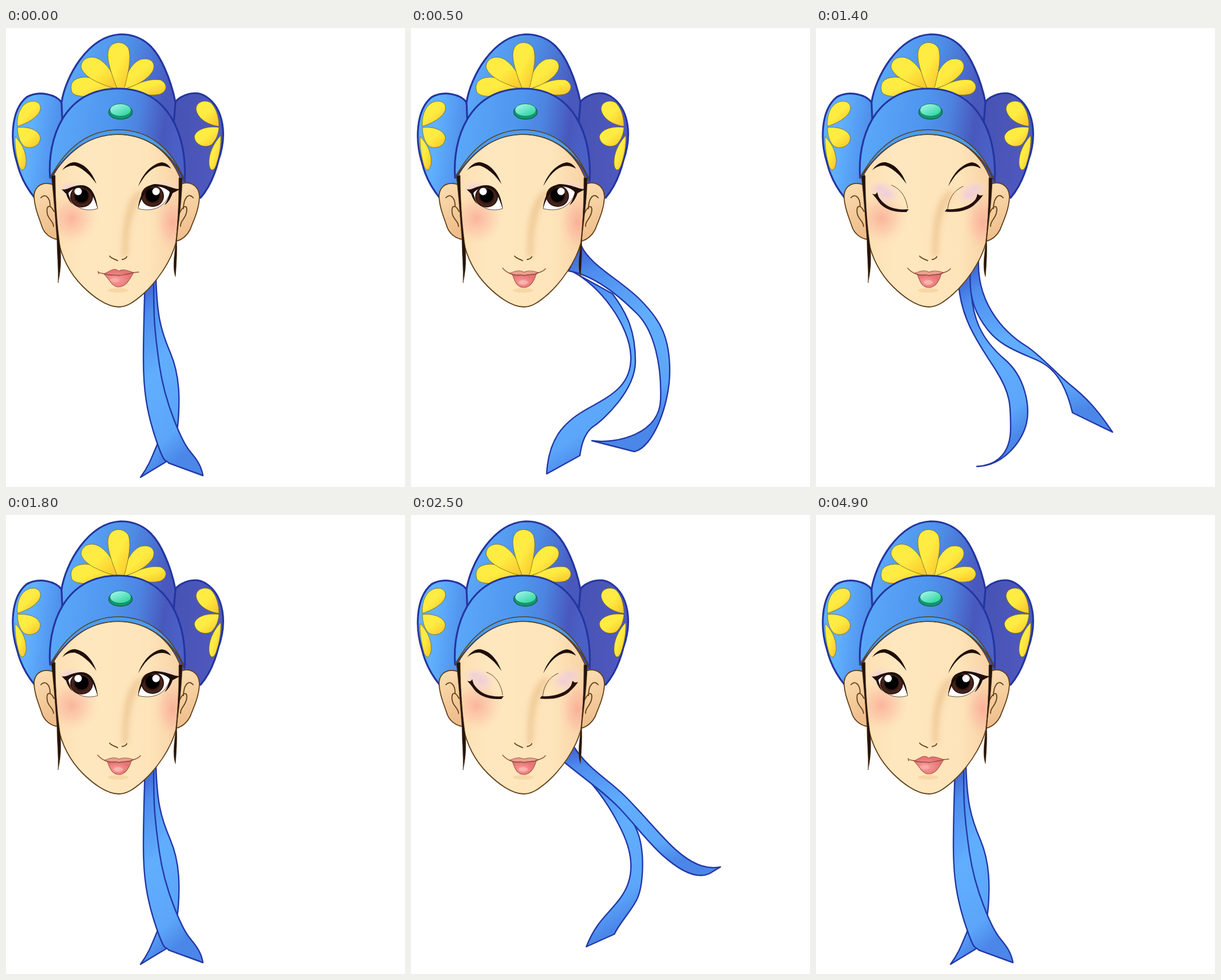
These frames come from a looping animation (697x803 px, 5100 ms). An HTML page:

```html
<!DOCTYPE html>
<html lang="en">
<head>
<meta charset="utf-8">
<title>Ribbon in the wind</title>
<style>
html, body { margin: 0; width: 100%; height: 100%; overflow: hidden; background: #fff; }
svg { display: block; width: 100%; height: 100%; }

/* front (f) and back (b) tail: hanging, curled, flying, falling, swinging, lifted */
:root {
  --hang-f: path("M243 440C241 500 240 530 240 580S245 670 262 720S278 752 284 761L344 783C340 760 328 750 318 736S278 660 268 590S258 500 258 440Z");
  --hang-b: path("M246 440C248 490 252 540 258 590S276 700 264 729S248 768 235 786L281 758C290 735 299 715 301 685S305 610 287 568S264 500 262 440Z");
  --curl-f: path("M275 425C320 432 365 470 395 500S438 590 436 650S360 728 316 722L390 741C422 735 452 660 452 600S435 510 400 475S312 415 297 380Z");
  --curl-b: path("M280 425C330 450 382 520 384 574S345 645 305 668S240 720 237 780L295 748C298 725 306 705 320 696S392 635 392 583S378 500 352 465Z");
  --fly-f: path("M285 412C330 450 380 450 430 443S520 434 560 438S625 485 681 527L670 487C650 462 625 430 560 427S470 440 430 437S325 425 300 368Z");
  --fly-b: path("M286 412C310 445 360 452 420 461S510 462 550 475S640 525 659 572L671 547C650 512 620 486 585 475S490 455 430 447S330 440 302 385Z");
  --fall-f: path("M270 425C266 470 278 500 300 528S350 565 388 582S440 640 448 673L518 707C490 665 470 645 445 625S390 570 365 555S280 490 284 405Z");
  --fall-b: path("M249 440C250 510 290 560 315 600S340 660 340 700S320 765 281 767L283 767C330 765 362 720 368 690S365 610 330 580S265 510 272 425Z");
  --swing-f: path("M262 436C320 440 345 490 362 530S390 595 415 625S490 690 549 663L563 641C535 655 495 658 470 643S405 600 393 555S370 440 285 402Z");
  --lift-f: path("M270 425C325 450 370 470 405 490S470 540 500 555S570 600 600 583L606 560C570 575 540 560 510 535S450 480 410 460S330 430 292 392Z");
  --lift-b: path("M275 422C335 448 375 490 405 540S425 620 400 650S350 690 330 745L380 725C390 705 410 690 425 670S445 580 430 545S380 480 340 455Z");
}

.tail { stroke: #2338a8; stroke-width: 2.4; stroke-linejoin: round; }
.front { d: var(--hang-f); animation: front 5100ms infinite; }
.back { d: var(--hang-b); animation: back 5100ms infinite; }
.swap { opacity: 0; animation: 5100ms step-end infinite; }
.open { animation-name: open; }
.shut { animation-name: shut; }
.calm { animation-name: calm; }
.smile { animation-name: smile; }
.round { animation-name: round; }

/* the drawing changes every 100 ms */
@keyframes front {
  0% { d: var(--hang-f); animation-timing-function: steps(5); }
  9.803% { d: var(--curl-f); animation-timing-function: steps(4); }
  17.647% { d: var(--fly-f); animation-timing-function: steps(5); }
  27.45% { d: var(--fall-f); animation-timing-function: steps(4); }
  35.294% { d: var(--hang-f); animation-timing-function: steps(4); }
  43.137% { d: var(--swing-f); animation-timing-function: steps(2); }
  47.058% { d: var(--lift-f); animation-timing-function: steps(4); }
  54.901%, 100% { d: var(--hang-f); }
}
@keyframes back {
  0% { d: var(--hang-b); animation-timing-function: steps(5); }
  9.803% { d: var(--curl-b); animation-timing-function: steps(4); }
  17.647% { d: var(--fly-b); animation-timing-function: steps(5); }
  27.45% { d: var(--fall-b); animation-timing-function: steps(4); }
  35.294% { d: var(--hang-b); animation-timing-function: steps(4); }
  43.137% { d: var(--curl-b); animation-timing-function: steps(2); }
  47.058% { d: var(--lift-b); animation-timing-function: steps(4); }
  54.901%, 100% { d: var(--hang-b); }
}
@keyframes open {
  0%, 31.372%, 52.941%, 100% { opacity: 1; }
  27.45%, 49.019% { opacity: 0; }
}
@keyframes shut {
  0%, 31.372%, 52.941%, 100% { opacity: 0; }
  27.45%, 49.019% { opacity: 1; }
}
@keyframes calm {
  0%, 21.568%, 96.078%, 100% { opacity: 1; }
  3.921%, 25.49% { opacity: 0; }
}
@keyframes round {
  0%, 7.843%, 17.647%, 47.058%, 100% { opacity: 0; }
  3.921%, 13.725%, 37.254% { opacity: 1; }
}
@keyframes smile {
  0%, 13.725%, 21.568%, 37.254%, 96.078%, 100% { opacity: 0; }
  7.843%, 17.647%, 25.49%, 47.058% { opacity: 1; }
}

.line { fill: none; stroke: #61401a; stroke-width: 1.8; stroke-linecap: round; stroke-linejoin: round; }
.hat { stroke: #2435a0; stroke-width: 3.2; stroke-linejoin: round; }
.petals { fill: url(#gold); stroke: #75621c; stroke-width: .8; }
.ear { fill: url(#earskin); stroke: #61401a; stroke-width: 1.8; }
.lip { stroke: #a9574f; stroke-width: 1.1; stroke-linejoin: round; }
.mouth { stroke: #8d5240; stroke-width: 1.4; }
.crease { stroke-width: 1; }
</style>
</head>
<body>
<svg viewBox="0 0 697 803">
  <defs>
    <linearGradient id="silk" x2=".25" y2="1">
      <stop offset="0" stop-color="#3c58cc"/>
      <stop offset=".18" stop-color="#4e8eee"/>
      <stop offset=".5" stop-color="#61aefe"/>
      <stop offset=".85" stop-color="#5ca6fa"/>
      <stop offset="1" stop-color="#4b87e8"/>
    </linearGradient>
    <linearGradient id="crown" x2="1" y2=".3">
      <stop offset=".1" stop-color="#5dabfa"/>
      <stop offset=".6" stop-color="#4d8de6"/>
      <stop offset="1" stop-color="#4858bd"/>
    </linearGradient>
    <linearGradient id="band" x2="1" y2=".1">
      <stop offset="0" stop-color="#5cabfb"/>
      <stop offset=".5" stop-color="#4f95ee"/>
      <stop offset=".68" stop-color="#4d84e0"/>
      <stop offset=".88" stop-color="#4858bd"/>
      <stop offset="1" stop-color="#4b60c6"/>
    </linearGradient>
    <linearGradient id="lobeL" x2="1" y2=".2">
      <stop offset=".35" stop-color="#60b0fe"/>
      <stop offset="1" stop-color="#4680e2"/>
    </linearGradient>
    <linearGradient id="lobeR" x2="1" y2=".2">
      <stop offset=".2" stop-color="#4753b5"/>
      <stop offset="1" stop-color="#5059be"/>
    </linearGradient>
    <linearGradient id="gold" x2=".9" y2="1">
      <stop offset=".5" stop-color="#ffec42"/>
      <stop offset="1" stop-color="#f9c62a"/>
    </linearGradient>
    <linearGradient id="gem" x2=".8" y2="1">
      <stop offset=".1" stop-color="#a4f4ec"/>
      <stop offset="1" stop-color="#29d59b"/>
    </linearGradient>
    <linearGradient id="skin">
      <stop offset="0" stop-color="#fde0b2"/>
      <stop offset=".25" stop-color="#fee7bf"/>
      <stop offset=".75" stop-color="#fee4b9"/>
      <stop offset="1" stop-color="#f8d2a6"/>
    </linearGradient>
    <linearGradient id="earskin" x2=".2" y2="1">
      <stop offset=".1" stop-color="#fbdcae"/>
      <stop offset="1" stop-color="#eebd8b"/>
    </linearGradient>
    <radialGradient id="blush">
      <stop offset="0" stop-color="#f99c8d" stop-opacity=".66"/>
      <stop offset=".5" stop-color="#fbb09c" stop-opacity=".4"/>
      <stop offset="1" stop-color="#fdd5b0" stop-opacity="0"/>
    </radialGradient>
    <radialGradient id="lilac">
      <stop offset="0" stop-color="#ecc8e0" stop-opacity=".9"/>
      <stop offset="1" stop-color="#f8dcd0" stop-opacity="0"/>
    </radialGradient>
    <radialGradient id="iris">
      <stop offset=".45" stop-color="#1c0c0a"/>
      <stop offset=".8" stop-color="#4b261d"/>
      <stop offset="1" stop-color="#2c120c"/>
    </radialGradient>
    <radialGradient id="rose" cx=".4" cy=".6">
      <stop offset="0" stop-color="#f8a09d"/>
      <stop offset="1" stop-color="#e87475"/>
    </radialGradient>
    <filter id="soft" x="-50%" width="200%"><feGaussianBlur stdDeviation="5"/></filter>
    <path id="face" d="M84 255C110 210 150 186 195 186C245 186 285 215 304 262C303 300 301 340 297 375C288 410 262 445 240 465C222 481 210 488 197 488C175 488 150 468 134 452C110 428 97 400 91 370C88 340 86 300 84 255Z"/>
    <clipPath id="inface"><use href="#face"/></clipPath>
  </defs>

  <g class="tail" fill="url(#silk)">
    <path class="back"/>
    <path class="front"/>
  </g>

  <!-- hat sides and crown -->
  <path class="hat" fill="url(#lobeL)" d="M97 130C88 117 58 108 36 121C7 145 8 200 19 235C25 260 36 280 50 297L120 270Z"/>
  <path class="hat" fill="url(#lobeR)" d="M295 130C306 117 330 108 348 119C382 140 386 190 371 232C364 260 352 283 340 297L280 270Z"/>
  <path class="hat" fill="url(#crown)" d="M97 130C104 85 143 14 200 11C242 11 263 38 277 70C286 90 293 115 296 130L290 200H100Z"/>
  <g class="petals">
    <path d="M192 109C168 116 125 127 115 112C110 95 120 86 140 86C162 88 180 97 192 109Z"/>
    <path d="M208 108C232 95 252 88 270 91C284 98 281 112 268 116C250 120 228 114 208 108Z"/>
    <path d="M194 107C165 99 135 86 131 68C132 52 150 46 165 56C182 68 192 88 194 107Z"/>
    <path d="M205 107C207 85 218 62 235 55C252 51 262 60 257 74C248 91 225 102 205 107Z"/>
    <path d="M195 108C182 75 174 50 180 36C186 22 207 22 214 36C220 55 212 85 206 108Z"/>
    <path d="M20 172C18 150 28 128 48 128C62 129 64 143 54 153C44 163 32 168 20 172Z"/>
    <path d="M20 174C38 172 58 178 60 192C60 207 42 213 32 207C23 200 20 185 20 174Z"/>
    <path d="M16 190C28 202 37 220 35 238C32 251 27 251 23 242C18 225 15 205 16 190Z"/>
    <path d="M372 172C355 170 335 160 332 142C332 128 350 124 359 132C369 143 372 160 372 172Z"/>
    <path d="M372 174C355 171 332 176 329 190C330 205 348 211 359 204C368 195 371 185 372 174Z"/>
    <path d="M375 188C361 204 353 222 355 240C357 251 363 251 367 240C373 222 376 205 375 188Z"/>
  </g>

  <!-- ears -->
  <path class="ear" d="M85 275C66 267 51 275 49 292C49 312 57 330 62 345C66 360 78 368 90 370Z"/>
  <path class="ear" d="M302 275C320 265 337 275 338 295C337 320 326 340 322 352C316 364 308 370 298 373Z"/>
  <path class="line" d="M61 297C67 289 77 295 77 311M84 321C76 306 70 312 72 324C73 334 83 338 83 347M327 297C318 286 310 300 310 316M303 324C312 306 318 311 315 324C312 335 304 338 305 347"/>

  <!-- face -->
  <use href="#face" fill="url(#skin)"/>
  <g clip-path="url(#inface)">
    <circle cx="115" cy="333" r="48" fill="url(#blush)"/>
    <ellipse cx="291" cy="340" rx="34" ry="55" fill="url(#blush)"/>
    <path d="M234 283C207 302 203 345 203 402L213 398C214 350 219 322 240 288Z" fill="#e9bd88" opacity=".65" filter="url(#soft)"/>
    <ellipse cx="112" cy="281" rx="24" ry="16" fill="url(#lilac)"/>
    <ellipse cx="278" cy="281" rx="24" ry="16" fill="url(#lilac)"/>
    <ellipse cx="196" cy="459" rx="18" ry="4" fill="#f1c990" opacity=".5"/>
  </g>
  <use href="#face" class="line"/>
  <g fill="#24130a" stroke="#61401a" stroke-width=".7">
    <path d="M79 258L86 258C86 310 90 350 95 385C97 415 94 430 91 446C92 420 89 395 89 370C86 330 83 290 79 258Z"/>
    <path d="M308 262L302 262C302 310 300 350 295 390C292 415 293 425 296 435C298 410 299 390 298 370C303 330 307 300 308 262Z"/>
  </g>
  <path class="line" d="M181 399C185 404 190 404 195 407M203 405C208 404 210 403 211 400"/>
  <g fill="#200d06">
    <path d="M98 249C105 239 113 234 122 235C140 239 151 254 158 273C147 257 135 246 121 241C112 240 105 243 98 249Z"/>
    <path d="M231 277C238 255 256 237 272 235C280 236 285 240 288 246C281 242 274 240 266 242C250 247 240 261 231 277Z"/>
  </g>

  <!-- eyes -->
  <g class="swap open">
    <path fill="#fff" stroke="#3c2315" stroke-width=".8" d="M107 286C115 278 122 277 132 277C150 278 157 297 160 316C140 322 116 317 107 286Z"/>
    <path fill="#fff" stroke="#3c2315" stroke-width=".8" d="M288 285C282 277 272 275 260 275C243 277 233 295 231 316C255 322 278 316 288 285Z"/>
    <g fill="url(#iris)">
      <ellipse cx="132" cy="295" rx="20" ry="19"/>
      <ellipse cx="256" cy="294" rx="20" ry="19"/>
    </g>
    <circle cx="132" cy="293" r="12"/>
    <circle cx="256" cy="292" r="12"/>
    <circle cx="126" cy="286" r="6.5" fill="#fff"/>
    <circle cx="262" cy="286" r="6.5" fill="#fff"/>
    <path fill="#1f0e08" d="M97 282C106 285 114 275 132 275C150 276 157 292 160 316C154 297 148 281 132 279C121 279 113 283 109 289C111 299 114 305 117 309C111 304 107 297 105 290Z"/>
    <path fill="#1f0e08" d="M306 281C297 285 282 273 260 273C243 275 233 293 231 315C237 297 245 279 260 277C271 277 281 281 286 287C284 298 280 305 277 310C284 305 288 297 291 289Z"/>
  </g>
  <g class="swap shut">
    <ellipse cx="124" cy="291" rx="27" ry="20" fill="url(#lilac)"/>
    <ellipse cx="267" cy="292" rx="26" ry="20" fill="url(#lilac)"/>
    <path class="line crease" d="M132 275C150 282 158 299 160 315M257 277C239 285 232 300 230 317"/>
    <path fill="#24100a" d="M98 290C103 292 105 291 107 287C108 292 109 295 111 298C122 314 140 319 162 317L158 322C137 323 117 317 108 302C105 298 102 294 98 290Z"/>
    <path fill="#24100a" d="M292 292C287 294 285 293 282 290C281 296 279 300 276 303C264 314 246 318 228 317L225 321C247 324 268 319 279 307C284 302 288 298 292 292Z"/>
  </g>

  <!-- mouths -->
  <g class="swap calm">
    <path class="lip" fill="url(#rose)" d="M171 430C178 428 184 422 190 422C194 422 195 425 198 425C203 421 212 424 223 428C217 437 211 453 196 453C184 452 180 438 171 430Z"/>
    <path class="line mouth" d="M161 427C164 429 168 429 172 430C182 434 190 431 198 433C207 431 214 431 222 428L232 427M161 426L162 430"/>
    <ellipse cx="190" cy="441" rx="8" ry="4" fill="#fbb3b0" opacity=".6"/>
  </g>
  <g class="swap smile">
    <path class="lip" fill="#eba08f" d="M172 429C180 426 187 424 191 425C195 425 195 427 198 427C204 424 214 425 223 428C215 433 206 434 198 433C188 434 180 433 172 429Z"/>
    <path class="lip" fill="url(#rose)" d="M177 431C184 435 190 431 198 433C205 431 212 433 219 430C214 446 207 454 197 454C185 453 182 445 177 431Z"/>
    <path class="line mouth" d="M160 420C165 426 170 429 177 431C185 434 190 430 198 433C206 430 212 433 220 429C227 427 232 425 235 421"/>
    <ellipse cx="196" cy="445" rx="8" ry="4" fill="#fbc0ba" opacity=".65"/>
  </g>
  <g class="swap round">
    <path class="line mouth" d="M167 432L177 434M215 434L222 430"/>
    <path class="lip" fill="url(#rose)" d="M173 433C179 430 183 422 189 422C193 421 194 424 196 424C202 419 209 423 212 428L218 433C214 439 212 455 197 455C182 455 181 440 173 433Z"/>
    <ellipse cx="195" cy="436" rx="8" ry="5" fill="#ffe9e6" stroke="#c05355"/>
  </g>

  <!-- brim and jewel -->
  <path class="hat" fill="url(#band)" d="M77 262C72 195 100 107 195 106C285 105 317 190 312 268C290 215 245 185 195 185C140 186 105 220 77 262Z"/>
  <path fill="#4a9cf2" stroke="#584322" stroke-width="1.6" d="M77 262C103 213 140 179 195 178C250 178 290 210 312 268C290 216 245 186 195 186C140 187 105 220 77 262Z"/>
  <ellipse cx="200" cy="147" rx="20.5" ry="12.5" fill="#0e9a73" stroke="#17624b" stroke-width="1.5"/>
  <ellipse cx="200" cy="143.5" rx="18.5" ry="11" fill="url(#gem)" stroke="#187a5c"/>
</svg>
</body>
</html>
```
